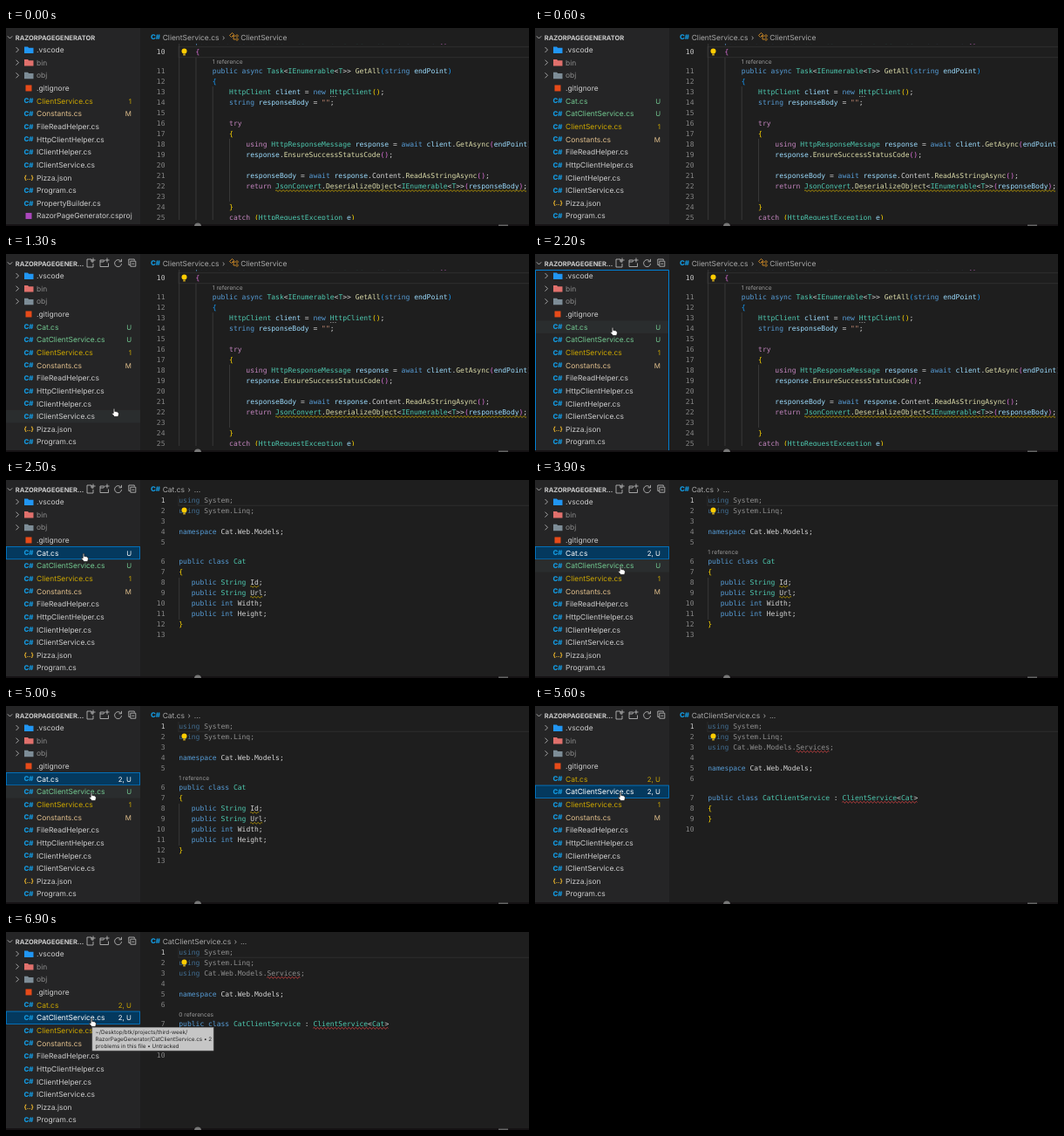
An HTML page for the animation above (7 s loop, 600 by 227 pixels).

```html
<!DOCTYPE html>
<html lang="en">
<head>
<meta charset="utf-8">
<title>Editor walkthrough</title>
<style>
html, body { margin: 0; height: 100%; overflow: hidden; background: #1e1e1e; }
svg { display: block; width: 100vw; height: 100vh; }
text { white-space: pre; font-family: Inter, Roboto, sans-serif; text-rendering: geometricPrecision; }
.code { font: 8px "DejaVu Sans Mono", monospace; }
.line { fill: none; stroke-width: .8; }
</style>
</head>
<body>
<svg id="stage" viewBox="0 0 600 227"></svg>
<script>
const LOOP = 7000, STEP = 100, ROW = 14.65, SIDE = 154, CHAR = 4.816, LEFT = 198.3;
const GREY = '#cccccc', DIM = '#8c8c8c', GREEN = '#73c991', AMBER = '#cca700', SAND = '#e2c08d', RED = '#f14c4c';
const BRACKETS = ['#ffd700', '#da70d6', '#179fff'];
const stage = document.getElementById('stage');

const esc = s => s.replace(/&/g, '&amp;').replace(/</g, '&lt;');
const text = (x, y, s, fill = GREY, size = 8.45, more = '') =>
  `<text x="${x}" y="${y}" fill="${fill}" font-size="${size}" ${more}>${esc(s)}</text>`;
const rect = (x, y, w, h, fill, more = '') =>
  `<rect x="${x}" y="${y}" width="${w}" height="${h}" fill="${fill}" ${more}/>`;
const line = (d, stroke, more = '') => `<path class="line" d="${d}" stroke="${stroke}" ${more}/>`;
const col = n => LEFT + CHAR * n;
const ease = p => p * p * (3 - 2 * p);

// Syntax colours, in the order of the groups in TOKENS
const TOKENS = new RegExp([
  '("[^"]*")',
  '\\b(public|class|async|string|int|new|namespace|await|where|^using)\\b',
  '\\b(try|catch|return|using)\\b',
  '\\b(Task|IEnumerable|T|HttpClient|HttpResponseMessage|HttpRequestException|JsonConvert|I?ClientService|CatClientService|String|Cat(?!\\.))\\b',
  '(DeserializeObject|\\w+(?=\\())',
  '\\b(endPoint|client|response|responseBody|e)\\b',
  '([{}()])', '\\w+|.'].join('|'), 'g');
const COLORS = ['#ce9178', '#569cd6', '#c586c0', '#4ec9b0', '#dcdcaa', '#9cdcfe'];

function highlight(src, depth = 0) {
  return src.split('\n').map(row => row.replace(TOKENS, (tok, ...groups) => {
    const kind = groups.slice(0, 7).findIndex(g => g !== undefined);
    let fill = COLORS[kind];
    if (kind === 6) fill = BRACKETS[('{('.includes(tok) ? depth++ : --depth) % 3];
    return fill ? `<tspan fill="${fill}">${esc(tok)}</tspan>` : esc(tok);
  }));
}

const view = o => ({ ...o, rows: highlight(o.src, o.depth) });
const service = view({
  file: 'ClientService.cs', first: 9, top: 15.6, active: 10, gap: 11, lens: '1 reference', lensCol: 8, faded: 0, depth: 1,
  guides: [[0, 18, 220], [4, 34, 220], [8, 67, 220], [12, 127, 199]],
  waves: [[22, 23, 60, AMBER]],
  src: `    public class ClientService<T>: IClientService where T: new()
    {
        public async Task<IEnumerable<T>> GetAll(string endPoint)
        {
            HttpClient client = new HttpClient();
            string responseBody = "";

            try
            {
                using HttpResponseMessage response = await client.GetAsync(endPoint);
                response.EnsureSuccessStatusCode();

                responseBody = await response.Content.ReadAsStringAsync();
                return JsonConvert.DeserializeObject<IEnumerable<T>>(responseBody);

            }
            catch (HttpRequestException e)`
});
const cat = view({
  file: 'Cat.cs', first: 1, top: 23.3, active: 1, gap: 6, lens: '1 reference', lensCol: 0, faded: 2,
  guides: [[0, 112, 160]],
  waves: [[8, 17, 2, AMBER], [9, 17, 3, AMBER]],
  src: `using System;
using System.Linq;

namespace Cat.Web.Models;

public class Cat
{
   public String Id;
   public String Url;
   public int Width;
   public int Height;
}
`
});
const catService = view({
  file: 'CatClientService.cs', first: 1, top: 23.3, active: 1, gap: 7, lens: '0 references', lensCol: 0, faded: 3,
  guides: [],
  waves: [[3, 21, 8, RED], [7, 32, 18, RED]],
  src: `using System;
using System.Linq;
using Cat.Web.Models.Services;

namespace Cat.Web.Models;

public class CatClientService : ClientService<Cat>
{
}
`
});

function wave(x, y, w, stroke) {
  const n = Math.round(w / 2);
  return line(`M${x} ${y}q1 -1.8 2 0` + 't2 0'.repeat(n - 1), stroke);
}

const bulb = (x, y) => `<circle cx="${x}" cy="${y - 1}" r="3" fill="#ffcc00"/>` +
  rect(x - 1.3, y + 2, 2.6, 2, '#c9a21a');

const csIcon = (x, y) => text(x, y + 2.8, 'C#', '#1497dc', 7.9, 'font-weight="800"');

function breadcrumb(v) {
  const isClass = v === service;
  return rect(SIDE, 0, 446, 18, '#1e1e1e') + csIcon(166, 10.5) +
    `<text x="179.7" y="13.5" fill="#a9a9a9" font-size="8.45">${v.file}<tspan dx="3.5">›</tspan>` +
    `<tspan dx="${isClass ? 18 : 4}">${isClass ? 'ClientService' : '...'}</tspan></text>` +
    (isClass ? line('M256.5 8.5l3-3 2 2-3 3zM260 9h3M261 9v4h2M263.5 9l1.5-1.5 1.5 1.5-1.5 1.5zM263.5 13l1.5-1.5 1.5 1.5-1.5 1.5z', '#ee9d28') : '');
}

function editor(v, settled, lens) {
  const y = n => v.top + 12 * (n - v.first) + (n >= v.gap ? 10 : 0);
  let out = rect(SIDE, 0, 446, 227, '#1e1e1e');
  out += rect(198, y(v.active) - 6, 403, 12, 'none', 'stroke="#2b2b2b" stroke-width="1.2"');
  for (const [c, a, b] of v.guides) out += line(`M${col(c) + .4} ${a}V${b}`, '#404040', 'stroke-width=".6"');
  v.rows.forEach((row, i) => {
    const n = v.first + i, base = y(n) + 2.8;
    const opacity = settled && n <= v.faded ? .62 : 1;
    out += `<text class="code" x="182.5" y="${base}" text-anchor="end" fill="${n === v.active ? '#c6c6c6' : '#858585'}">${n}</text>` +
      `<text class="code" x="${LEFT}" y="${base}" fill="#d4d4d4" opacity="${opacity}">${row}</text>`;
  });
  if (settled) {
    for (const [n, c, len, stroke] of v.waves) out += wave(col(c), y(n) + 5, len * CHAR, stroke);
    out += bulb(204.5, v === service ? 27.5 : 35.5);
  }
  if (lens) out += text(col(v.lensCol), y(v.gap) - 8.2, v.lens, '#999', 6.65);
  if (v === service) out += line('M372 78.5h7', '#aaa', 'stroke-dasharray="1.2 1.5"');
  return out + rect(SIDE, 220, 446, 7, '#1e1e1e') + breadcrumb(v);
}

const folder = (y, fill) => `<path d="M21 ${y - 3.6}h4l1.2 1.3h5.3v6.2h-10.5z" fill="${fill}"/>`;

function icon(name, y) {
  const folders = { '.vscode': '#2196f3', bin: '#e0706c', obj: '#7d8d97' };
  if (folders[name]) return line(`M11.5 ${y - 3}l3 3-3 3`, '#c5c5c5') + folder(y, folders[name]);
  if (name.endsWith('.cs')) return csIcon(20.5, y);
  if (name.endsWith('.json')) return text(20.5, y + 2.5, '{..}', '#fbc02d', 7, 'font-weight="700"');
  return rect(22.5, y - 3.5, 7, 7, name === '.gitignore' ? '#e64a19' : '#ab47bc');
}

function sidebar(t, current, pointer) {
  const flagged = t >= 3000, checked = t >= 5500;
  const marks = {
    bin: [DIM], obj: [DIM],
    'Cat.cs': flagged ? [AMBER, '2, U'] : [GREEN, 'U'],
    'CatClientService.cs': checked ? [RED, '2, U'] : [GREEN, 'U'],
    'ClientService.cs': [AMBER, '1'],
    'Constants.cs': [SAND, 'M']
  };
  const files = ['.vscode', 'bin', 'obj', '.gitignore', ...(t >= 500 ? ['Cat.cs', 'CatClientService.cs'] : []),
    'ClientService.cs', 'Constants.cs', 'FileReadHelper.cs', 'HttpClientHelper.cs', 'IClientHelper.cs',
    'IClientService.cs', 'Pizza.json', 'Program.cs', 'PropertyBuilder.cs', 'RazorPageGenerator.csproj'].slice(0, 14);
  const hover = pointer ? Math.floor((pointer[1] - 14.7) / ROW) : -1;

  let out = rect(0, 0, SIDE, 227, '#252526');
  files.forEach((name, i) => {
    const y = 25 + ROW * i;
    let [fill = GREY, badge = ''] = marks[name] || [];
    if (name === current && current !== service.file) {
      out += rect(.4, y - 7.2, SIDE - .8, ROW - .3, '#04395e', 'stroke="#007fd4" stroke-width=".8"');
      fill = '#fff';
    } else if (i === hover) out += rect(0, y - 7.3, SIDE, ROW, '#2a2d2e');
    out += icon(name, y) + text(35, y + 3, name, fill) + text(144, y + 3, badge, fill, 7.9, 'text-anchor="end"');
  });

  out += line('M1.8 9.3l2.7 2.7 2.7-2.7', '#c5c5c5');
  out += text(10.8, 13.5, pointer ? 'RAZORPAGEGENER...' : 'RAZORPAGEGENERATOR', GREY, 7.5, 'font-weight="700"');
  if (pointer) out += line('M98 6h-5v9h7v-4M98 6v3h2M100 4.5v5M97.6 7h5' +
    'M112.5 7h-4.5v7.5h9.5v-4M108 9h4l1-2M116 4.5v5M113.5 7h5' +
    'M132 8.5a4 4 0 1 0 .6 2.5M132.5 5.8v3h-3' +
    'M142.300 12.500h-1.500v-6.500h6.500v1.500M142.800 8.200h6v6h-6zM144.300 11.200h3', '#c5c5c5');
  if (t >= 2200 && t < 2300) out += line('M.5 227V18.5H153.5V227', '#007fd4', 'style="stroke-width:1"');
  return out;
}

// Each leg: start, end, from, to
const LEGS = [
  [1000, 1300, [200, 215], [124, 177]],
  [1700, 2100, [124, 177], [89, 84]],
  [3100, 3650, [89, 84], [98, 99]]
];
function pointerAt(t) {
  const leg = LEGS.filter(l => t >= l[0]).pop();
  if (!leg) return null;
  const [start, end, a, b] = leg, p = ease(Math.min(1, (t - start) / (end - start)));
  const pos = a.map((v, i) => v + (b[i] - v) * p);
  return pos[0] < SIDE ? pos : null;
}

const hand = ([x, y]) => `<path transform="translate(${x} ${y})" fill="#fff" stroke="#111" stroke-width=".7"
  d="M-.8 .8Q0-.8 .8 .8V3.6Q2 2.8 2.5 4Q3.7 3.3 4.1 4.5Q5.6 4.2 5.4 6Q5.5 7.8 4.4 9.6H.4Q-.8 7.8-2.6 6Q-2.8 4.6-.8 5.6z"/>`;

function tooltip(opacity) {
  const rows = ['~/Desktop/btk/projects/third-week/', 'RazorPageGenerator/CatClientService.cs • 2', 'problems in this file • Untracked'];
  return `<g opacity="${opacity}">` + rect(99, 109.5, 139, 26.5, '#c6c6c6', 'stroke="#9a9a9a" stroke-width=".6"') +
    rows.map((s, i) => text(102.5, 117.3 + 7.8 * i, s, '#262626', 6.3)).join('') + '</g>';
}

function scene(t) {
  const v = t < 2300 ? service : t < 5200 ? cat : catService;
  const settled = v === service || (v === cat ? t >= 2500 : t >= 5500);
  const lens = v === service || (v === cat ? t >= 3300 : t >= 6100);
  const pointer = pointerAt(t);
  return editor(v, settled, lens) + sidebar(t, v.file, pointer) +
    rect(0, 225, 600, 2, '#151214') + '<circle cx="220" cy="227.5" r="4" fill="#777"/>' + rect(565, 225.5, 11, 2, '#666') +
    (t >= 6600 ? tooltip(Math.min(1, (t - 6500) / 300)) : '') + (pointer ? hand(pointer) : '');
}

let shown = -1;
function frame(now) {
  const t = Math.floor(now % LOOP / STEP) * STEP;
  if (t !== shown) stage.innerHTML = scene(shown = t);
  requestAnimationFrame(frame);
}
frame(performance.now());
</script>
</body>
</html>
```
